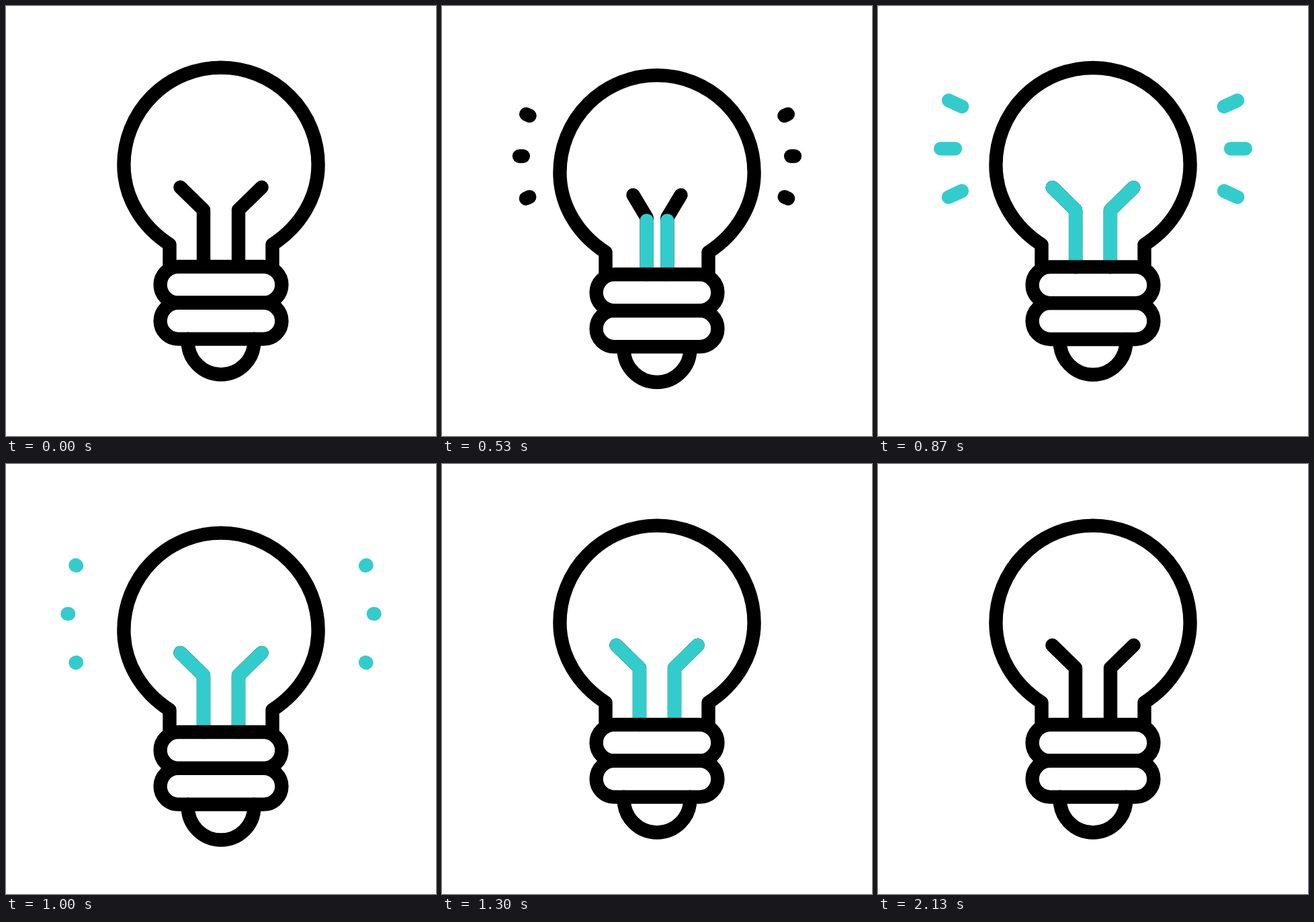
These frames come from a looping animation (640 by 640 pixels, 2500 ms). An HTML page:

```html
<!DOCTYPE html>
<html lang="en">
<head>
<meta charset="utf-8">
<title>Light bulb</title>
<style>
  html, body { margin: 0; width: 100%; height: 100%; overflow: hidden; background: #fff; }
  svg { display: block; width: 100vw; height: 100vh; }
  #bulb { fill: none; stroke: #000; stroke-width: 20.4; stroke-linecap: round; stroke-linejoin: round; }
  .glow { stroke: #33cccc; }
</style>
</head>
<body>
<svg viewBox="0 0 640 640">
  <g id="bulb">
    <g id="rays"></g>
    <g id="wires"></g>
    <path d="M243.5 388V355C202.5 328.5 175.4 285.5 175.4 236.2A144.6 144.6 0 0 1 464.6 236.2C464.6 285.5 437.5 328.5 396.5 355V388"/>
    <rect x="229.6" y="388" width="180.8" height="53.8" rx="26.9"/>
    <rect x="229.6" y="441.8" width="180.8" height="53.8" rx="26.9"/>
    <path d="M270.7 495.6V499.2A49.3 49.3 0 0 0 369.3 499.2V495.6"/>
  </g>
</svg>
<script>
const LOOP = 2500, FPS = 30;
const TEAL_DELAY = 6;

// Keys are [frame, value] pairs, eased in between.
const DROP = [[12.5, 0], [19.5, 23.1], [26.5, 0], [33.7, 23.1], [39, 0]];
const PINCH = [[10, 0], [20, 1], [26.3, 0]];
const FILL = [[10, 0], [20, 1], [52.5, 1], [64, 0]];
const RAY_END = [[14, 0], [21, 1]];
const RAY_START = [[18, 0], [25, 1]];

// Inner and outer ends of the left rays.
const RAYS = [
  [130.5, 151.8, 103.5, 139.5],
  [120.8, 212, 91.5, 212],
  [130.2, 272.6, 103.5, 284.8]
];

const bulb = document.getElementById('bulb');

function add(parent, tag, glow) {
  const el = document.createElementNS('http://www.w3.org/2000/svg', tag);
  if (glow) el.setAttribute('class', 'glow');
  document.getElementById(parent).append(el);
  return el;
}

function set(el, attrs) {
  for (const name in attrs) el.setAttribute(name, attrs[name]);
}

function show(el, on) {
  el.style.display = on ? '' : 'none';
}

function valueAt(keys, f) {
  if (f <= keys[0][0]) return keys[0][1];
  for (let i = 1; i < keys.length; i++) {
    const [f0, v0] = keys[i - 1], [f1, v1] = keys[i];
    if (f < f1) {
      const p = (f - f0) / (f1 - f0);
      return v0 + (v1 - v0) * p * p * (3 - 2 * p);
    }
  }
  return keys[keys.length - 1][1];
}

const mirror = (x, right) => right ? 640 - x : x;

const wires = [], rays = [];
for (const glow of [false, true]) {
  for (const right of [false, true]) {
    const el = add('wires', 'path', glow);
    el.setAttribute('pathLength', 1);
    wires.push({ el, glow, right });
    for (const ends of RAYS) rays.push({ el: add('rays', 'line', glow), glow, right, ends });
  }
}

function drawWires(f) {
  const pinch = valueAt(PINCH, f), fill = valueAt(FILL, f);
  for (const { el, glow, right } of wires) {
    const shaft = mirror(294 + 16.5 * pinch, right);
    const tip = mirror(259.4 + 38.7 * pinch, right);
    el.setAttribute('d', `M${shaft} 388V303.5L${tip} 269.8`);
    if (glow) {
      show(el, fill > 0);
      el.setAttribute('stroke-dasharray', fill < 1 ? `${fill} 2` : 'none');
    }
  }
}

function drawRays(f) {
  for (const { el, glow, right, ends: [x0, y0, x1, y1] } of rays) {
    const local = glow ? f - TEAL_DELAY : f;
    const a = valueAt(RAY_START, local), b = valueAt(RAY_END, local);
    show(el, b > a);
    set(el, {
      x1: mirror(x0 + (x1 - x0) * a, right), y1: y0 + (y1 - y0) * a,
      x2: mirror(x0 + (x1 - x0) * b, right), y2: y0 + (y1 - y0) * b
    });
  }
}

function draw() {
  const t = performance.now() % LOOP;
  const f = Math.floor(t * FPS / 1000 + 0.15);
  bulb.setAttribute('transform', `translate(0 ${valueAt(DROP, f)})`);
  drawWires(f);
  drawRays(f);
  requestAnimationFrame(draw);
}
draw();
</script>
</body>
</html>
```
